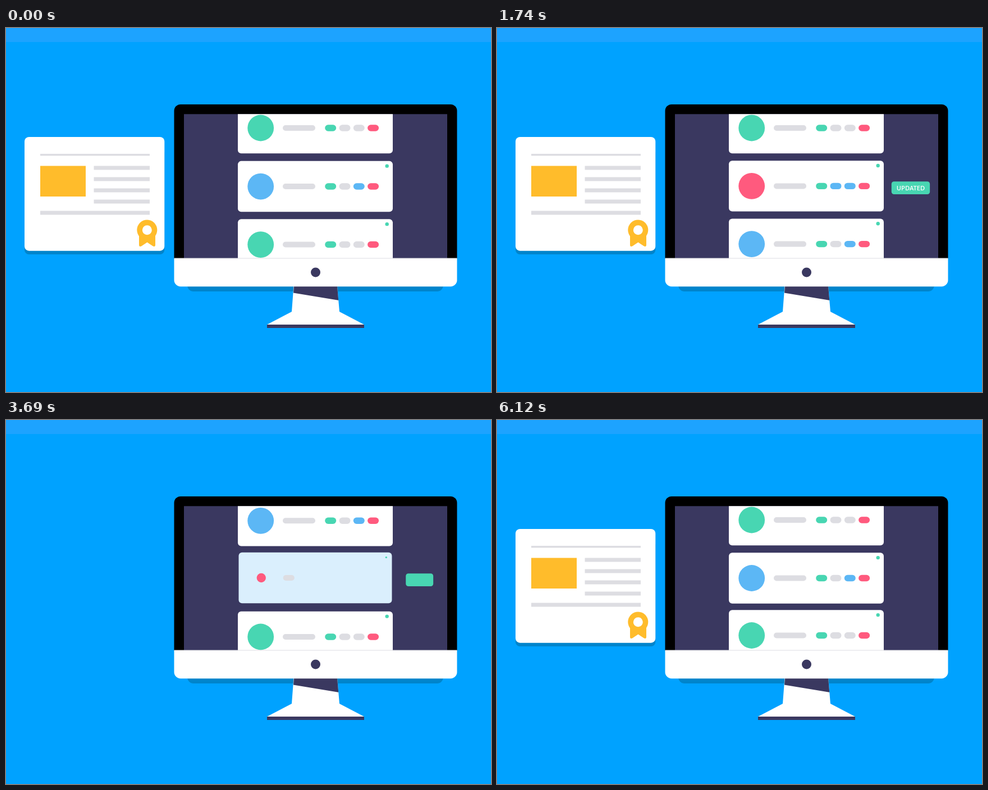
Animation, 864 px wide and 648 px high, one loop 6.3 s. Source, as an HTML page:

```html
<!DOCTYPE html>
<html lang="en">
<head>
<meta charset="utf-8">
<title>Record updates</title>
<style>
  html, body { margin: 0; width: 100%; height: 100%; overflow: hidden; background: #00a2ff; }
  svg { display: block; width: 100vw; height: 100vh; }
  text { font: 600 11.2px "Open Sans", "Noto Sans", sans-serif; fill: #fff; }
</style>
</head>
<body>
<svg viewBox="0 0 864 648">
  <defs><clipPath id="screen"><path d="M317 153.300H786V410H317Z"/></clipPath></defs>
  <rect width="864" height="648" fill="#00a2ff"/>
  <rect width="864" height="25" fill="#1da3ff"/>

  <g id="certificate">
    <rect x="33" y="214" width="249.300" height="189" rx="8" fill="#0084cb"/>
    <rect x="33" y="194" width="249.300" height="202.700" rx="8" fill="#fff"/>
    <path fill="#dddde2" d="M61 224H256v3.500H61Z M156.500 245.500H256v7H156.500Z M156.500 265.500H256v7H156.500Z M156.500 285.500H256v7H156.500Z M156.500 305.500H256v7H156.500Z M61 325.500H256v7H61Z"/>
    <path fill="#ffbc2b" d="M61 245.500H142V300H61Z M237 364V386q0 4 4 2.500L251.500 381.500 262 388.500q4 1.500 4-2.500V364Z"/>
    <circle cx="251.300" cy="359.500" r="18" fill="#ffbc2b"/>
    <circle cx="251.300" cy="359.700" r="8.500" fill="#fff"/>
  </g>

  <rect x="323" y="440" width="456" height="29" rx="11" fill="#0084cb"/>
  <path d="M512.500 459H590L594 505 638 528H465L509 505Z" fill="#fff"/>
  <path d="M513 459H590L592.300 484.700 512 471.500Z M465 528H638V534H465Z" fill="#3a3860"/>
  <path d="M299.500 411V147.500a11.500 11.500 0 0 1 11.500-11.500H792a11.500 11.500 0 0 1 11.500 11.500V411Z"/>
  <rect x="317" y="153.300" width="469" height="257" fill="#3a3860"/>
  <g clip-path="url(#screen)">
    <g id="list"></g>
    <g id="badge">
      <rect id="plate" y="273.300" height="22.700" rx="4.500" fill="#48d6b2"/>
      <text id="label" x="736.800" y="289" text-anchor="middle">UPDATED</text>
    </g>
  </g>
  <path d="M299.500 410H803.500V448.700a11.500 11.500 0 0 1-11.500 11.500H311a11.500 11.500 0 0 1-11.500-11.500Z" fill="#fff"/>
  <path d="M299.500 410H803.500" stroke="#dddde2"/>
  <circle cx="551.500" cy="435" r="8.500" fill="#3a3860"/>
</svg>
<script>
const LOOP = 6300;
const GREEN = '#48d6b2', BLUE = '#5cb7f5', RED = '#ff5a7e', GRAY = '#dddde2';
const byId = id => document.getElementById(id);

const clamp = v => Math.min(1, Math.max(0, v));
const lerp = (a, b, p) => a + (b - a) * p;
const quadIn = p => p * p;
const quadOut = p => 1 - (1 - p) ** 2;
const cubicOut = p => 1 - (1 - p) ** 3;
const cubicInOut = p => p < .5 ? 4 * p ** 3 : 1 - 4 * (1 - p) ** 3;
const expoOut = p => p >= 1 ? 1 : 1 - 2 ** (-10 * p);
const tween = (t, start, length, ease) => ease(clamp((t - start) / length));

function set(el, attrs) {
  for (const name in attrs) el.setAttribute(name, attrs[name]);
  return el;
}
function add(parent, tag, attrs) {
  return parent.appendChild(set(document.createElementNS('http://www.w3.org/2000/svg', tag), attrs));
}

// Alternating insertions (push down) and scrolls (two rows up).
const moves = [
  [0, 360, quadOut],
  [1720, 1050, cubicInOut],
  [3000, 450, quadOut],
  [4890, 1230, cubicInOut]
];

const cycles = [
  { start: 0, end: 3000, leave: 240, offset: 0, scroll: 1720, tint: [0, 180, 255], white: 630 },
  { start: 3000, end: LOOP, leave: 300, offset: 3120, scroll: 4890, tint: [93, 183, 248], white: 690 }
];

// Card coordinates are relative to the card centre.
function makeCard(color, middle, stops) {
  const group = add(byId('list'), 'g', {});
  const panel = add(group, 'rect', { x: -138, y: -45.2, width: 276, height: 90.4, rx: 6, fill: '#fff' });
  const avatar = add(group, 'circle', { cx: -97.3, r: 23.4, fill: color });
  const bar = add(group, 'rect', { x: -58, y: -5, width: 58, height: 10, rx: 5, fill: GRAY });
  const pills = [GREEN, ...middle, RED].map((fill, i) => {
    const pill = add(group, 'g', {});
    add(pill, 'rect', { x: -10, y: -5.7, width: 20, height: 11.4, rx: 5.7, fill });
    set(pill, { transform: `translate(${27.2 + i * 25.3} 0)` });
    return pill;
  });
  const dot = add(group, 'circle', { cx: 127.7, cy: -36.4, r: 3.2, fill: GREEN });
  return { group, panel, avatar, bar, pills, dot, stops };
}

const makeGreen = (...stops) => makeCard(GREEN, [GRAY, GRAY], stops);
const makeBlue = (...stops) => makeCard(BLUE, [GRAY, BLUE], stops);
const makeRed = (...stops) => makeCard(RED, [BLUE, BLUE], stops);

const added = [
  makeRed(281.4, 281.4, 76, 76, -132),
  makeRed(281, 281, 281, 281, 73)
];
const cards = [
  makeGreen(178, 178, -27, -27, -235),
  makeBlue(281.5, 384.6, 179.3, 179.3, -29),
  makeGreen(385, 488, 282.8, 386, 178),
  makeBlue(488.5, 591.5, 386.3, 489.5, 281.5),
  makeGreen(592, 695, 489.8, 593, 383.5),
  ...added
];

function placeCard(card, t, scaleX = 1) {
  const y = moves.reduce((pos, [start, length, ease], i) =>
    pos + (card.stops[i + 1] - card.stops[i]) * tween(t, start, length, ease), card.stops[0]);
  set(card.group, { transform: `translate(551 ${y}) scale(${scaleX} 1)` });
}

function growCard(card, t, cycle) {
  const phase = t - cycle.offset;
  const visible = t >= cycle.start && phase > 180;
  set(card.group, { visibility: visible ? 'visible' : 'hidden' });
  if (!visible) return;

  placeCard(card, t, tween(phase, 180, 600, expoOut));
  const tint = clamp((cycle.white - phase) / 520);
  set(card.panel, { fill: `rgb(${cycle.tint.map(c => Math.round(lerp(255, c, tint)))})` });
  const content = tween(phase, 490, 600, cubicOut);
  set(card.avatar, { r: 23.4 * content });
  set(card.bar, { width: 58 * content });
  set(card.dot, { r: 3.2 * tween(phase, 476, 423, cubicOut) });
  card.pills.forEach((pill, i) => {
    const size = tween(phase, 600 + i * 60, 450, cubicOut);
    set(pill, { transform: `translate(${27.2 + i * 25.3} 0) scale(${size})` });
  });
}

function drawCertificate(t, cycle) {
  const phase = t - cycle.offset;
  const x = phase < 660
    ? 283 * tween(t, cycle.start, cycle.leave, quadIn)
    : lerp(-290, 0, tween(phase, 660, 570, cubicOut));
  set(byId('certificate'), { transform: `translate(${x} 0)` });
}

function drawBadge(t, cycle) {
  const phase = t - cycle.offset;
  const width = 68.4 * tween(phase, 417, 450, cubicOut);
  const slide = 90 * tween(t, cycle.scroll, 400, quadIn);
  set(byId('plate'), { x: 736.7 - width / 2, width });
  set(byId('label'), { opacity: clamp((phase - 780) / 200) });
  set(byId('badge'), { transform: `translate(${slide} 0)` });
}

function draw(t) {
  const cycle = cycles.find(c => t < c.end);
  cards.forEach(card => placeCard(card, t));
  added.forEach((card, i) => growCard(card, t, cycles[i]));
  drawCertificate(t, cycle);
  drawBadge(t, cycle);
}

const begin = performance.now();
function tick() {
  draw((performance.now() - begin) % LOOP);
  requestAnimationFrame(tick);
}
tick();
</script>
</body>
</html>
```
